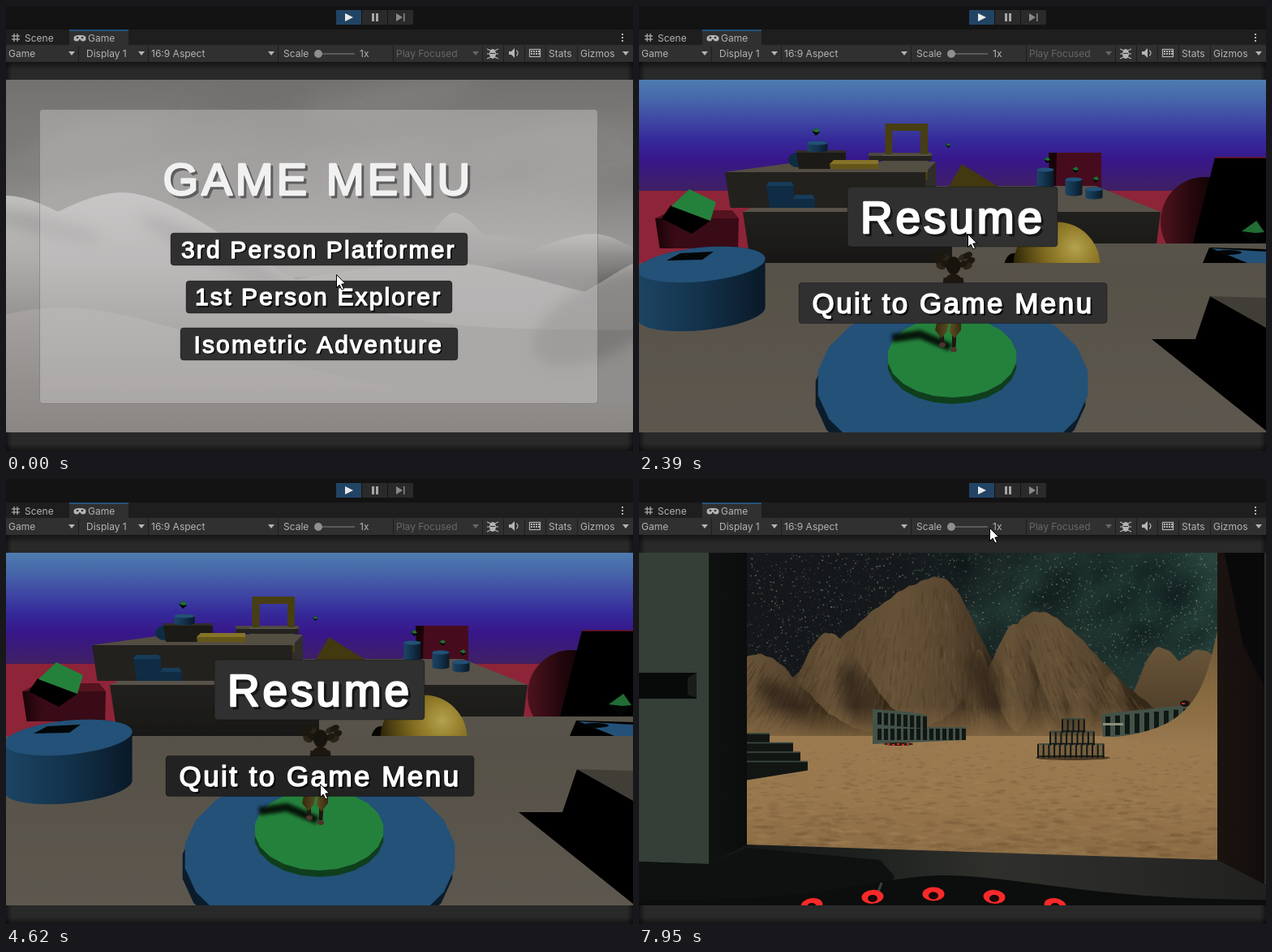
These frames come from a looping animation (773x549 px, 8 s). An HTML page with a canvas:

```html
<!DOCTYPE html>
<html lang="en">
<head>
<meta charset="utf-8">
<style>
html, body { margin: 0; width: 100%; height: 100%; overflow: hidden; background: #131313; }
canvas { display: block; }
</style>
</head>
<body>
<canvas id="stage" width="773" height="549"></canvas>
<script>
const W = 773, H = 549, TOP = 91, BOTTOM = 526, LOOP = 8000;
const ctx = document.getElementById('stage').getContext('2d');

// ---------- helpers ----------
const ramp = (t, a, b) => Math.min(1, Math.max(0, (t - a) / (b - a)));
const times = (n, f) => { for (let i = 0; i < n; i++) f(i); };
function random(seed) {
  return () => (seed = (seed * 16807) % 2147483647) / 2147483647;
}
function layer(draw) {
  const c = document.createElement('canvas');
  c.width = W; c.height = H;
  draw(c.getContext('2d'));
  return c;
}
function trace(g, p) {
  g.beginPath();
  for (let i = 0; i < p.length; i += 2) g.lineTo(p[i], p[i + 1]);
}
function poly(g, fill, ...p) { trace(g, p); g.closePath(); g.fillStyle = fill; g.fill(); }
function line(g, color, width, ...p) {
  trace(g, p); g.strokeStyle = color; g.lineWidth = width; g.stroke();
}
function rect(g, fill, x, y, w, h) { g.fillStyle = fill; g.fillRect(x, y, w, h); }
function oval(g, fill, x, y, rx, ry = rx, rot = 0) {
  g.beginPath(); g.ellipse(x, y, rx, ry, rot, 0, 7); g.fillStyle = fill; g.fill();
}
function stops(grad, colors) {
  colors.forEach((c, i) => grad.addColorStop(i / (colors.length - 1), c));
  return grad;
}
const down = (g, y0, y1, ...c) => stops(g.createLinearGradient(0, y0, 0, y1), c);
const across = (g, x0, x1, ...c) => stops(g.createLinearGradient(x0, 0, x1, 0), c);
const glow = (g, x, y, r, ...c) => stops(g.createRadialGradient(x, y, 0, x, y, r), c);

// Each peak is [x, top, left width, right width].
function skyline(x, base, peaks) {
  return Math.min(...peaks.map(([px, top, left, right]) =>
    base - (base - top) * Math.exp(-Math.pow(Math.abs(x - px) / (x < px ? left : right), 1.8))));
}
function ridge(g, fill, base, floor, peaks, rough = 0) {
  const p = [0, floor];
  for (let x = 0; x <= W + 3; x += 3) {
    p.push(x, skyline(x, base, peaks) + rough * (Math.sin(x * .17) + Math.sin(x * .41)));
  }
  poly(g, fill, ...p, W, floor);
}
function label(g, text, x, y, size, shadow, fill = '#fff') {
  g.font = `${size}px "Liberation Sans", Arial, sans-serif`;
  g.letterSpacing = size * 0.07 + 'px';
  g.lineJoin = 'round';
  g.lineWidth = size * 0.045;
  for (const [color, d] of [[shadow, size * 0.055], [fill, 0]]) {
    g.fillStyle = g.strokeStyle = color;
    g.strokeText(text, x + d, y + d);
    g.fillText(text, x + d, y + d);
  }
}
function button(g, x, y, w, h, shade) {
  g.beginPath(); g.roundRect(x, y, w, h, 4);
  g.fillStyle = `rgb(${shade},${shade},${shade})`; g.fill();
  g.strokeStyle = 'rgba(0,0,0,.3)'; g.lineWidth = 1; g.stroke();
}

// ---------- editor frame ----------
const editor = layer(g => {
  const ink = '#b4b4b4', dim = '#676767', bar = '#303030';
  rect(g, '#131313', 0, 0, W, H);
  rect(g, '#1e1e1e', 0, 29, W, 19);
  rect(g, bar, 0, 48, W, 21);
  rect(g, bar, 78, 29, 73, 20);
  rect(g, '#23537c', 78, 29, 73, 2);
  times(3, i => rect(g, i ? '#2a2a2a' : '#214465', 407 + i * 32, 5, 31, 18));
  poly(g, '#e8e8e8', 418, 9, 428, 14, 418, 19);
  times(2, i => rect(g, '#a5a5a5', 451 + i * 5, 9, 3, 10));
  poly(g, '#888', 481, 9, 489, 14, 481, 19);
  rect(g, '#888', 490, 9, 1.5, 10);

  const clear = 'rgba(0,0,0,0)', shade = 'rgba(0,0,0,.5)';
  rect(g, '#292929', 0, 69, W, H);
  rect(g, down(g, 69, 79, shade, clear), 0, 69, W, 10);
  rect(g, down(g, 540, H, clear, shade), 0, 540, W, 9);
  rect(g, across(g, 0, 7, shade, clear), 0, 69, 7, H);
  rect(g, across(g, W, W - 7, shade, clear), W - 7, 69, 7, H);
  for (const x of [89, 175, 335, 477, 587, 613, 639, 665, 704]) rect(g, '#1d1d1d', x, 49, 1, 20);

  g.font = '12px Inter, "Open Sans", sans-serif';
  const write = (text, x, y = 63, color = ink) => { g.fillStyle = color; g.fillText(text, x, y); };
  write('Scene', 23, 44);
  write('Game', 101, 44);
  write('Game', 3);
  write('Display 1', 99);
  write('16:9 Aspect', 179);
  write('Scale', 342);
  write('1x', 436);
  write('Play Focused', 481, 63, dim);
  write('Stats', 669);
  write('Gizmos', 708);
  for (const x of [81, 167, 327, 579, 764]) poly(g, x === 579 ? dim : ink, x - 4, 56, x + 4, 56, x, 61);

  times(3, i => rect(g, ink, 759, 34 + i * 4, 2, 2));
  for (const d of [-2, 2]) {
    line(g, ink, 1.2, 12 + d, 34, 12 + d, 44);
    line(g, ink, 1.2, 7, 39 + d, 17, 39 + d);
    oval(g, ink, 91 + d * 2, 40, 3.5);
  }
  rect(g, ink, 87, 36, 8, 5);
  for (const x of [88, 94]) oval(g, bar, x, 39, 1.3);
  rect(g, '#5a5a5a', 385, 58, 45, 2);
  oval(g, '#8f8f8f', 385, 59, 5);
  for (const d of [-1, 0, 1]) line(g, ink, 1.2, 593, 59 + d * 6, 600, 59 + d * 3, 607, 59 + d * 6);
  oval(g, ink, 600, 59, 4, 6);
  rect(g, bar, 597, 58, 6, 1);
  poly(g, ink, 620, 56, 623, 56, 627, 52, 627, 64, 623, 60, 620, 60);
  g.beginPath(); g.arc(627, 58, 4, -1, 1); g.stroke();
  g.strokeRect(645.5, 53.5, 13, 9);
  times(8, i => rect(g, ink, 647 + i % 4 * 3, 55 + (i >> 2) * 3, 2, 2));
});

// ---------- start menu ----------
const dunes = layer(g => {
  rect(g, down(g, TOP, 330, '#73716f', '#858381', '#a09e9d'), 0, TOP, W, 435);
  const rnd = random(11);
  g.filter = 'blur(14px)';
  times(16, i => oval(g, `rgba(${i % 2 ? '175,172,170' : '95,93,92'},.16)`,
    rnd() * W, 110 + rnd() * 140, 50 + rnd() * 70, 8 + rnd() * 12, -0.2));
  g.filter = 'none';
  ridge(g, down(g, 255, 320, '#aaa8a7', '#8b8988'), 335, 345, [[552, 255, 45, 60], [600, 283, 100, 130]]);
  ridge(g, down(g, 282, 335, '#b3b1b0', '#8e8c8b', '#777574'), 345, 360, [[725, 281, 130, 90]]);
  ridge(g, down(g, 318, BOTTOM, '#a9a7a6', '#9c9a99', '#8d8a88'), 380, BOTTOM, [[540, 316, 300, 190], [800, 310, 90, 60]]);
  ridge(g, down(g, 232, 400, '#c1c0bf', '#aeacab', '#908e8d'), 400, BOTTOM, [[0, 234, 1, 200], [143, 230, 225, 215]]);
  // soft shade on the lee sides
  g.filter = 'blur(8px)';
  oval(g, 'rgba(105,103,102,.3)', 255, 303, 100, 14, .45);
  oval(g, 'rgba(110,108,107,.25)', 50, 272, 70, 12, .25);
  oval(g, 'rgba(80,78,77,.3)', 735, 385, 95, 45, -.5);
  g.filter = 'none';
  ridge(g, down(g, 373, BOTTOM, '#a5a2a1', '#969391', '#898684'), 490, BOTTOM, [[70, 372, 300, 300]]);
  g.beginPath(); g.roundRect(41.5, 127.5, 688, 363, 4);
  g.fillStyle = 'rgba(208,206,206,.42)'; g.fill();
  g.strokeStyle = 'rgba(100,98,98,.45)'; g.stroke();
  label(g, 'GAME MENU', 193.5, 233, 56.3, '#5f5e5e', '#f1f1f1');
});
const menuItems = [['3rd Person Platformer', 203, 366, 13], ['1st Person Explorer', 222, 328, 11], ['Isometric Adventure', 215, 342, 16.5]];
function drawMenu(hot, amount) {
  ctx.drawImage(dunes, 0, 0);
  menuItems.forEach(([text, x, width, pad], i) => {
    const y = 280 + i * 58.5;
    button(ctx, x, Math.round(y), width, 40, i === hot ? 48 * (1 - amount) : 48);
    label(ctx, text, x + pad, y + 30.7, 30.1, '#0c0c0c');
  });
}

// ---------- platformer ----------
const BLUE = '#3274ab', GREEN = '#34b956', STONE = '#7d766a';
// A box seen from above; a back edge reaching further right shows its side.
function block(g, top, front, x, y, w, h, rise, left = 0, right = 0) {
  const r = x + w, back = y - rise;
  poly(g, front, x, y, r, y, r - Math.max(0, right) * .1, y + h, x + h * .15, y + h);
  if (right < 0) poly(g, '#45423a', r, y, r - right, back, r - right, back + h, r, y + h);
  poly(g, top, x, y, r, y, r - right, back, x + left, back);
}
function drum(g, x, y, rx, ry, h, rot = 0) {
  g.beginPath();
  g.ellipse(x, y + h, rx, ry, rot, 0, Math.PI);
  g.ellipse(x, y, rx, ry, rot, Math.PI, Math.PI * 2);
  g.closePath();
  g.fillStyle = across(g, x - rx, x + rx, '#28628f', '#1b476a', '#0d2438'); g.fill();
  oval(g, BLUE, x, y, rx, ry, rot);
}
function gem(g, x, y, r) {
  poly(g, '#050a06', x - r, y - 1, x + r * .3, y - r, x + r, y + 1, x, y + r);
  poly(g, '#2f9c4b', x - r, y - 1, x + r * .3, y - r, x + r, y, x + r * .2, y + 1);
}
function disc(g, fill, x, y, rx, ry) {
  const p = [];
  times(22, i => {
    const a = (i + 0.5) / 11 * Math.PI;
    p.push(x + rx * Math.cos(a), y + ry * Math.sin(a));
  });
  poly(g, fill, ...p);
}
const platforms = layer(g => {
  rect(g, down(g, TOP, 240, '#6fb1fb', '#6592f3', '#5a67ea', '#4c3bdc', '#4f20c4', '#572aa0', '#60307c'), 0, TOP, W, 160);
  rect(g, '#cb3350', 0, 228, W, 90);
  // distant level
  block(g, '#6b1227', '#64112a', 506, 182, 64, 42, 1);
  poly(g, '#240409', 505, 181, 515, 181, 514, 224, 506, 222);
  block(g, STONE, down(g, 254, 317, '#2f2e2a', '#22211e'), 128, 254, 515, 63, 32, 72, 80);
  block(g, '#77705f', '#312f2b', 106, 205, 247, 44, 13, 94, -13);
  block(g, '#6c665a', '#34322d', 283, 185, 78, 6, 4);
  g.strokeStyle = '#66591a'; g.lineWidth = 9;
  g.strokeRect(308, 149.5, 43.5, 60);
  rect(g, STONE, 300, 183, 58, 5);
  rect(g, '#34322d', 300, 185, 58, 6);
  rect(g, '#312f2b', 300, 205, 53, 12);
  rect(g, '#77705f', 300, 191, 56, 14);
  oval(g, '#16405f', 195, 190, 11, 9);
  block(g, '#45413a', '#262521', 194, 181, 61, 20, 3);
  drum(g, 220, 169, 12.5, 2.5, 9);
  block(g, '#bda539', '#8f7b22', 235, 195, 60, 6, 5, 5);
  poly(g, '#5e5217', 398, 195, 451, 228, 379, 228);
  times(2, i => block(g, '#215680', '#173f61', 157 + i * 33, 222 + i * 16, 34 - i * 7, 27 - i * 16, 5, 3, 3));
  [501, 536, 561].forEach((x, i) => {
    drum(g, x, 202 + i * 12, 10.5, 2.5, 26 - i * 8);
    gem(g, x + 2, 190 + i * 12, 4);
  });
  gem(g, 218, 155, 5);
  gem(g, 381, 172, 3);
  // right side
  oval(g, across(g, 643, 720, '#701b2a', '#350b13', '#050101'), 697, 266, 54, 55);
  rect(g, STONE, 386, 293, W, 30);
  poly(g, '#000', 710, 187, W, 187, W, 293, 683, 293);
  line(g, '#9c2238', 1.5, 710, 187, W, 187);
  gem(g, 757, 279, 14);
  poly(g, '#000', 703, 298, W, 300, W, 317, 695, 317);
  poly(g, BLUE, 706, 299, W, 303, W, 317, 750, 317);
  oval(g, '#04070a', 726, 304, 17, 3);
  oval(g, '#080702', 462, 323, 12, 18);
  oval(g, glow(g, 538, 298, 82, '#ffe873', '#dbbc45', '#b0922b', '#74601a', '#35290a'), 515, 320, 53.5);
  // near floor
  rect(g, down(g, 317, BOTTOM, '#7b7467', '#857d70'), 0, 317, W, 209);
  block(g, '#7a1a2d', across(g, 20, 45, '#230409', '#521020'), 20, 262, 103, 37, 10, 20, 8);
  poly(g, '#000', 39, 246, 88, 265, 65, 281, 28, 262);
  poly(g, GREEN, 62, 226, 95, 242, 88, 265, 40, 247);
  oval(g, '#090908', 40, 383, 38, 13, .35);
  drum(g, 77, 319, 79, 21, 60, -.1);
  poly(g, '#05080a', 34, 314, 51, 305, 92, 303, 78, 313);
  poly(g, '#000', 632, 411, 686, 411, 704, 358, W, 396, W, 524);
  poly(g, '#5d584e', 704, 358, W, 360, W, 397);
  disc(g, '#10283d', 384, 478, 168, 108);
  disc(g, BLUE, 387, 465, 168, 107);
  disc(g, '#15592a', 386, 441, 80, 50);
  disc(g, GREEN, 386, 433, 80, 50);
  g.filter = 'blur(2px)';
  line(g, 'rgba(4,14,6,.9)', 10, 312, 410, 346, 405, 384, 421);
});
function drawFigure(sway) {
  const g = ctx, dark = '#2a2118';
  const cloth = across(g, 366, 400, '#4e3e17', '#8a7030', '#3f3212');
  for (const side of [-1, 1]) {
    const foot = 381 + side * 8;
    line(g, dark, 5, foot, 400, foot - side, 421);
    poly(g, cloth, 387, 352, 387 + side * 11, 352, foot + side * 8, 400, foot, 410, foot - side * 6, 402, 386, 376);
    oval(g, '#6e4a3c', foot - side, 421 + side * 3, 4, 3);
  }
  g.save();
  g.translate(sway, sway * 0.4);
  oval(g, dark, 387, 344, 12, 14);
  oval(g, '#4d3c29', 387, 349, 6, 8);
  for (const side of [-1, 1]) {
    line(g, dark, 4, 387 + side * 10, 335, 387 + side * 13, 355, 387 + side * 12, 374);
    times(5, i => oval(g, i % 2 ? '#3c3321' : '#2a2316', 388 + side * (15 + 5 * Math.cos(i * 1.26)), 314 + 7 * Math.sin(i * 1.26), 6, 4, -side * .4));
  }
  oval(g, '#211c12', 387, 320, 9, 11);
  g.restore();
}
function drawPlatformer(t) {
  ctx.drawImage(platforms, 0, 0);
  drawFigure(t < 2000 ? Math.sin((t - 1560) / 500) * 0.8 : 0.6);
  if (t < 2000) return;
  rect(ctx, 'rgba(0,0,0,.3)', 0, TOP, W, 435);
  const hover = ramp(t, 2960, 3100) - ramp(t, 3980, 4120) + ramp(t, 4550, 4790);
  button(ctx, 257, 223, 259, 74, 48);
  label(ctx, 'Resume', 273, 280, 55, '#161616');
  button(ctx, 197, 341.5, 380, 50, 48 * (1 - hover));
  label(ctx, 'Quit to Game Menu', 213.5, 379, 35, '#0a0a0a');
}

// ---------- explorer ----------
const LEFT = 133, RIGHT = 713, VIEW = RIGHT - LEFT;
function drawSpace(g, rnd) {
  rect(g, across(g, 133, 713, '#14161a', '#15191c', '#1b2b28', '#25403a'), LEFT, TOP, VIEW, 240);
  g.filter = 'blur(9px)';
  times(70, i => oval(g, i % 3 ? 'rgba(62,102,86,.16)' : 'rgba(12,18,20,.3)',
    400 + rnd() * 320, 85 + rnd() * 130, 8 + rnd() * 30, 5 + rnd() * 14, -.5));
  g.filter = 'none';
  times(7000, () => {
    const s = rnd() ** 3, size = 1 + s * .6;
    rect(g, `rgba(${rnd() < .3 ? '190,165,135' : '125,155,145'},${s * .6})`, LEFT + rnd() * VIEW, TOP + rnd() * 180, size, size);
  });
}
function drawMountains(g, rnd) {
  const far = [[640, 207, 38, 70], [690, 211, 70, 90]];
  const main = [[372, 121, 185, 75], [490, 163, 80, 118], [463, 178, 45, 38], [232, 189, 52, 70], [150, 216, 100, 75]];
  const spurs = [[418, 208, 16, 26], [506, 222, 22, 26], [545, 257, 22, 20], [582, 240, 20, 30]];
  ridge(g, down(g, 205, 310, '#695539', '#4a3a27'), 322, 325, far, .6);
  for (const [peaks, alpha] of [[main, 1], [spurs, .7]]) {
    for (const peak of peaks) {
      const [x, , left, right] = peak;
      g.globalAlpha = alpha;
      ridge(g, across(g, x - left, x + right, '#483825', '#5d4a31', '#665237', '#594630', '#352919'), 318, 322, [peak], .7);
    }
  }
  g.globalAlpha = 1;
  // gullies run down the slopes
  times(1400, i => {
    const x = LEFT + rnd() * 490, top = skyline(x, 318, main) + 6;
    const y = top + rnd() * (312 - top), lean = (x - 372) * .04;
    line(g, `rgba(${i % 2 ? '28,20,12' : '150,122,84'},.09)`, 2, x, y, x + lean, y + 14);
  });
  g.filter = 'blur(7px)';
  for (const [x, y] of [[180, 275], [265, 268], [427, 255]]) oval(g, 'rgba(26,19,12,.5)', x, y, 15, 42, x < 200 ? -.9 : -.25);
  g.filter = 'none';
  rect(g, down(g, 280, 318, 'rgba(140,110,70,0)', 'rgba(140,110,70,.75)'), LEFT, 280, VIEW, 38);
}
function drawGround(g, rnd) {
  rect(g, down(g, 317, 470, '#9b7a50', '#98774d', '#8a6a43'), LEFT, 317, VIEW, 160);
  times(1400, i => {
    const d = rnd();
    oval(g, `rgba(${i % 2 ? '70,48,26' : '190,155,108'},.1)`, LEFT + rnd() * VIEW, 322 + d * 150, 2 + d * 8, .6 + d * 1.8);
  });
}
function drawColony(g) {
  const wall = '#435247', gap = '#111714';
  poly(g, wall, 288, 284, 330, 287, 355, 291, 355, 306, 403, 306, 403, 322, 288, 327);
  times(14, i => {
    const x = 294 + i * 8;
    if (i < 8) rect(g, gap, x, 288 + i * .7, 5, 15);
    rect(g, gap, x, 308, 5, 14);
  });
  oval(g, '#241c15', 320, 327, 18, 2);
  times(5, i => rect(g, '#d92a25', 306 + i * 6, 326 + i % 2, 3, 2));
  poly(g, wall, 570, 290, 680, 278, RIGHT, 276, RIGHT, 318, 572, 318);
  times(9, i => rect(g, gap, 575 + i * 12, 293 - i * 1.2, 6, 24));
  rect(g, '#8a8f7c', 572, 301, 25, 3);
  oval(g, '#1a1512', 673, 277, 6, 4);
  rect(g, '#c22a22', 669, 276, 4, 2);
  // sand slope on the right
  g.beginPath();
  g.moveTo(RIGHT, 188);
  g.bezierCurveTo(702, 235, 695, 275, 655, 299);
  g.quadraticCurveTo(625, 316, 575, 319);
  g.lineTo(RIGHT, 335);
  g.fillStyle = down(g, 190, 335, '#6c5639', '#86693f', '#9b7a50'); g.fill();
  // open scaffold in three tiers
  oval(g, 'rgba(25,18,10,.6)', 535, 344, 46, 3);
  times(3, i => {
    const half = 41 - i * 13.5, y = 327 - i * 15.5, mid = 533 + i * 1.5;
    rect(g, 'rgba(15,22,19,.25)', mid - half, y, half * 2, 16);
    for (let x = mid - half; x <= mid + half; x += 6.7) line(g, gap, 2, x, y, x, y + 17);
    line(g, '#33443b', 1.5, mid - half, y, mid + half, y);
    line(g, gap, 1.5, mid - half, y + 15, mid + half, y + 15);
  });
  times(4, i => {
    const y = 314 + i * 11.5, w = 28 + (i && 20 + i * 9);
    poly(g, '#121613', LEFT, y, LEFT + w, y, LEFT + w, y + 11, LEFT, y + 14 + i * 3);
    line(g, '#3c4b42', 1.5, LEFT, y, LEFT + w, y);
  });
}
function drawCabin(g) {
  rect(g, '#353f37', 0, TOP, 86, 384);
  rect(g, across(g, 86, LEFT, '#101211', '#0b0d0c'), 86, TOP, 47, 390);
  rect(g, '#080a09', 0, 239, 71, 32);
  poly(g, '#181d1a', 60, 245, 71, 239, 71, 270, 60, 266);
  rect(g, across(g, RIGHT, W, '#1b1310', '#120d0d'), RIGHT, TOP, 60, 435);
  poly(g, '#09090a', 722, TOP, W, TOP, W, 260, 745, 205);
  rect(g, '#2b302b', 771, TOP, 2, 409);
  poly(g, across(g, 90, W, '#131615', '#1c1f1d', '#2f302c', '#292a27', '#20211f'),
    0, 472, 86, 475, LEFT, 451, RIGHT, 470, W, 501, W, BOTTOM, 0, BOTTOM);
  poly(g, '#0e1110', 0, 472, 86, 475, LEFT, 455, 297, 470, 315, 490, 300, BOTTOM, 0, BOTTOM);
  ridge(g, '#0b0e0d', 520, BOTTOM, [[375, 489, 150, 190]]);
  line(g, '#3a423d', 3, 299, 498, 293, 515);
  for (let k = -2; k <= 2; k++) {
    const x = 363 + k * 75, y = 512 + 3.4 * k * k;
    oval(g, '#fb2929', x, y, 13.5, 8.5, k * .08);
    oval(g, '#160908', x, y + 2, 6, 4.5);
  }
}
const canyon = layer(g => {
  const rnd = random(77);
  drawSpace(g, rnd);
  drawMountains(g, rnd);
  drawGround(g, rnd);
  drawColony(g);
  drawCabin(g);
});

// ---------- timeline ----------
// Pointer moves: [start, end, x, y]
const moves = [
  [70, 270, 397, 300], [940, 1500, 405, 315], [1800, 2530, 405, 273], [2600, 3020, 416, 376], [3430, 3780, 538, 273],
  [3980, 4560, 387, 376], [5090, 5160, 386, 356], [5360, 5370, 383, 367], [6200, 6600, 465, 260], [6700, 7250, 465, 224], [7560, 7920, 432, 60]
];
function drawPointer(t) {
  let x = 407, y = 331;
  for (const [from, to, nx, ny] of moves) {
    const k = ramp(t, from, to);
    x += (nx - x) * k;
    y += (ny - y) * k;
  }
  ctx.save();
  ctx.translate(Math.round(x) + .5, Math.round(y) + .5);
  poly(ctx, '#fff', 0, 0, 0, 16, 3.6, 12.6, 6.5, 18.5, 9, 17.4, 6.3, 11.6, 11, 11.2);
  ctx.strokeStyle = '#000'; ctx.lineWidth = 1; ctx.stroke();
  ctx.restore();
}
function draw(t) {
  ctx.drawImage(editor, 0, 0);
  ctx.save();
  ctx.beginPath(); ctx.rect(0, TOP, W, BOTTOM - TOP); ctx.clip();
  if (t < 1290) drawMenu(0, ramp(t, 940, 1080));
  else if (t < 4760) drawPlatformer(t);
  else if (t < 6140) drawMenu(1, ramp(t, 5730, 6010));
  else ctx.drawImage(canyon, 0, 0);
  ctx.restore();
  drawPointer(t);
}
const start = performance.now();
function frame() {
  draw((performance.now() - start) % LOOP);
  requestAnimationFrame(frame);
}
frame();
</script>
</body>
</html>
```
